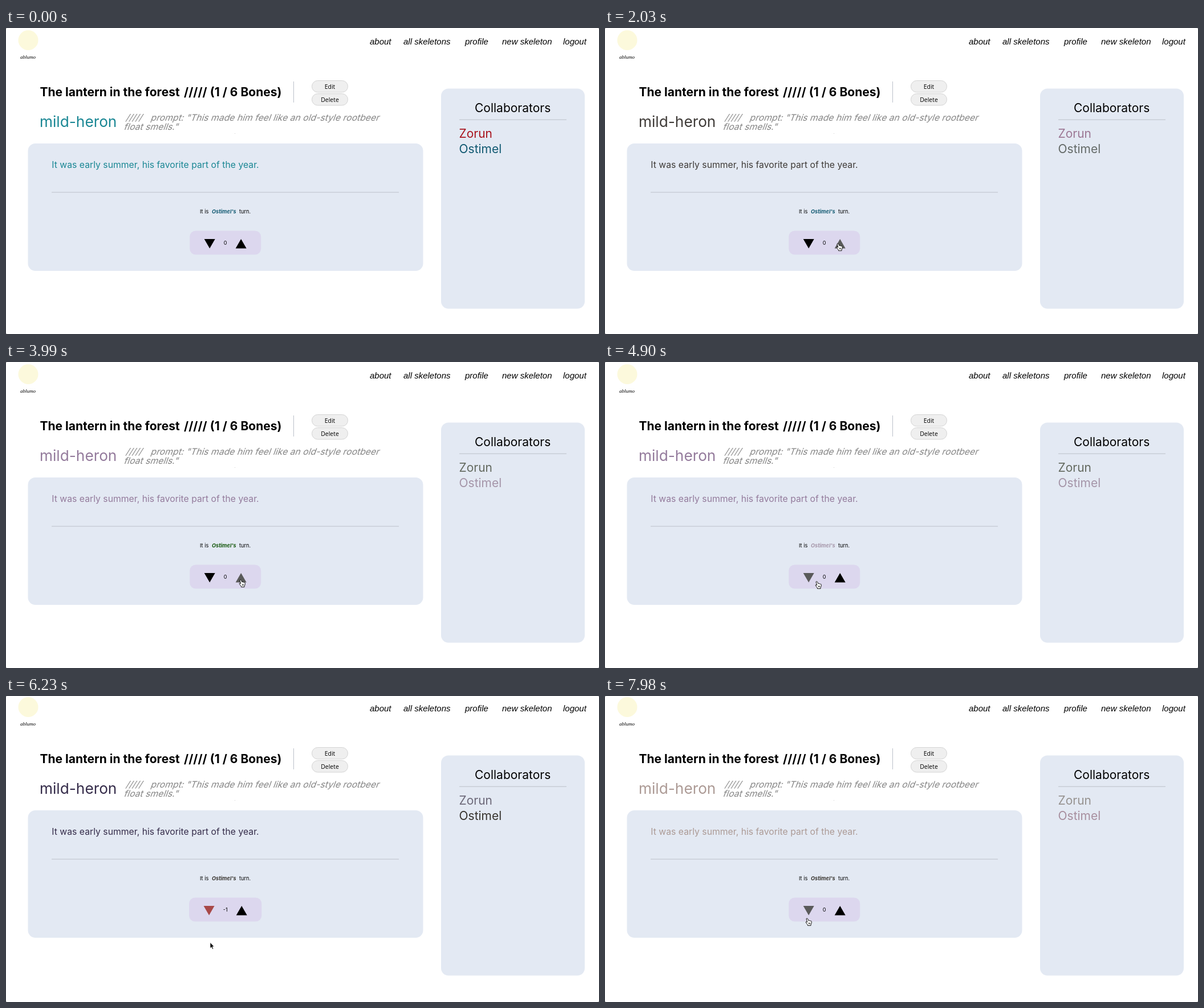
An HTML page for the animation above (8000 ms loop, 1040x538 px).

```html
<!DOCTYPE html>
<html lang="en">
<head>
<meta charset="utf-8">
<title>Skeleton page</title>
<style>
  html, body { margin: 0; width: 100%; height: 100%; overflow: hidden; background: #888; }
  svg { display: block; width: 100vw; height: 100vh; font-family: Inter, sans-serif; }
  text { white-space: pre; }
  .nav { font: italic 15px "Liberation Sans", sans-serif; }
  .mark { font: italic 9px "Liberation Serif", serif; }
  .title { font-size: 21px; font-weight: 700; }
  .author { font-size: 26.25px; }
  .prompt { font-size: 15.75px; fill: #858585; }
  .story { font-size: 15.75px; }
  .side { font-size: 21px; }
  .small { font-size: 9.2px; }
  .next { font-weight: 700; font-style: italic; }
  .ui { font: 10.5px "Open Sans", sans-serif; }
  .ui, #count { text-anchor: middle; }
  .button { fill: #efefef; stroke: #d4d4d4; }
  .panel { fill: #e3e9f3; }
  .rule { fill: none; stroke: #bcc0c9; }
</style>
</head>
<body>
<svg viewBox="0 0 1040 538">
  <rect width="1040" height="538" rx="2" fill="#fff"/>
  <g id="page">
    <circle cx="39" cy="21.5" r="17.5" fill="#fcf9dc"/>
    <text class="mark" x="25" y="54">ablumo</text>
    <g class="nav">
      <text x="638" y="29">about</text>
      <text x="697" y="29">all skeletons</text>
      <text x="805" y="29">profile</text>
      <text x="870" y="29">new skeleton</text>
      <text x="977" y="29">logout</text>
    </g>

    <text class="title" x="59.5" y="120">The lantern in the forest</text>
    <text class="title" x="312" y="120">///// (1 / 6 Bones)</text>
    <path class="rule" d="M504.5 94V131"/>
    <rect class="button" x="536.5" y="92.5" width="63" height="20.5" rx="10.2"/>
    <rect class="button" x="536.5" y="115.5" width="63" height="20.5" rx="10.2"/>
    <text class="ui" x="568" y="106.5">Edit</text>
    <text class="ui" x="568" y="130">Delete</text>

    <text class="author" id="author" x="59" y="173.8">mild-heron</text>
    <g class="prompt">
      <text transform="translate(209.5 163) skewX(-20)">/////</text>
      <text transform="translate(253 163) skewX(-20)">prompt: "This made him feel like an old-style rootbeer</text>
      <text transform="translate(206 179) skewX(-20)">float smells."</text>
    </g>
    <rect x="401" y="185" width="1" height="1" fill="#ccc"/>

    <rect class="panel" x="38.5" y="203" width="693" height="224" rx="13"/>
    <text class="story" id="story" x="80.3" y="246">It was early summer, his favorite part of the year.</text>
    <path class="rule" d="M80 288.9H689"/>
    <text class="small" x="340" y="326.3">It is</text>
    <text class="small next" id="next" x="361" y="326.3">Ostimel's</text>
    <text class="small" x="409" y="326.3">turn.</text>

    <rect id="voteBox" y="356.5" height="42" rx="10.5" fill="#dcd7ee"/>
    <path id="down" d="M-9.5 371H9.5L0 387.5Z"/>
    <path id="up" d="M-9.5 387.5H9.5L0 371Z"/>
    <text class="small" id="count" x="384.7" y="381.3"></text>

    <rect class="panel" x="763" y="106.5" width="252" height="387" rx="13"/>
    <text class="side" x="822" y="147.7">Collaborators</text>
    <path class="rule" d="M795 161.2H983"/>
    <text class="side" id="first" x="794.5" y="193">Zorun</text>
    <text class="side" id="second" x="794.5" y="219.8">Ostimel</text>
  </g>
  <path id="arrow" d="M0 0V10.4L2.4 8.2L4 12L5.8 11.2L4.2 7.6H7.2Z"
    stroke="#fff" stroke-width=".8"/>
  <path id="hand" fill="#fff" stroke="#111" stroke-linejoin="round"
    d="M-2.6-6Q-3.8-6.4-3.9-5L-2.2.8L-4-.2Q-5.4 0-4.6 1.4L-1.6 5.2V6.6H4V5L5.2 2V-.7Q4.8-2 3.6-1.3Q3-2.5 1.8-1.9Q1-3-.3-2.3L-1.4-5.2Q-1.8-6-2.6-6ZM.6 1.6V4.2M2.3 1.6V4.2"/>
</svg>
<script>
const LOOP = 8000, STEP = 70, CENTER = 384.7, ARROW_Y = 379, TURN_LAG = 100;
const HOVER = [90, 90, 90], IDLE = [0, 0, 0], LIKED = [47, 158, 65], DISLIKED = [168, 72, 72];

// every redraw of the page gives the writers new colours
const redraws = [
  { at: 0, vote: 0, main: "#1a8794", first: "#a8121c", second: "#125a72" },
  { at: 2030, vote: 0, main: "#3f3b38", first: "#9c7794", second: "#646a68" },
  { at: 2240, vote: 1, main: "#a90a10", first: "#96a0a8", second: "#14570c" },
  { at: 3990, vote: 0, main: "#947b9c", first: "#63695f", second: "#a595a8" },
  { at: 5880, vote: -1, main: "#352c4a", first: "#6c6878", second: "#38342f" },
  { at: 7910, vote: 0, main: "#ac9a95", first: "#96928f", second: "#a88f9f" },
];

const entry = { at: 840, x: 446, y: 372 };
const moves = [
  { from: 840, to: 1400, x: 411, y: 385 },
  { from: 2240, to: 2660, x: 395, y: 450 },
  { from: 3780, to: 3990, x: 414, y: 389 },
  { from: 4130, to: 5320, x: 358, y: 393 },
  { from: 5880, to: 6510, x: 358, y: 462 },
  { from: 6860, to: 7490, x: 357, y: 397 },
];

const el = id => document.getElementById(id);
const clamp = v => Math.min(1, Math.max(0, v));
const mix = (a, b, p) => a + (b - a) * p;
const paint = (id, color) => el(id).setAttribute("fill", color);
const place = (id, x, y) => el(id).setAttribute("transform", `translate(${x} ${y})`);
const pageAt = t => redraws.findLast(r => r.at <= Math.max(0, t));

function ease(t, from, to) {
  const p = clamp((t - from) / (to - from));
  return p * p * (3 - 2 * p);
}

function cursorAt(t) {
  return moves.reduce((pos, m) => {
    const p = ease(t, m.from, m.to);
    return { x: mix(pos.x, m.x, p), y: mix(pos.y, m.y, p) };
  }, entry);
}

// draws a vote arrow and returns how far the cursor hovers over it
function drawArrow(id, x, base, cursor) {
  const hover = clamp((30 - Math.hypot(cursor.x - x, cursor.y - ARROW_Y)) / 8);
  paint(id, `rgb(${base.map((v, i) => mix(v, HOVER[i], hover))})`);
  place(id, x, 0);
  return hover;
}

function render(t) {
  const { vote, main, first, second } = pageAt(t);
  paint("author", main);
  paint("story", main);
  paint("first", first);
  paint("second", second);
  paint("next", pageAt(t - TURN_LAG).second);

  el("count").textContent = vote;
  const half = 59.6 + el("count").getComputedTextLength() / 2;
  const gap = half - 35;
  el("voteBox").setAttribute("x", CENTER - half);
  el("voteBox").setAttribute("width", half * 2);

  const cursor = cursorAt(t);
  const hover = Math.max(
    drawArrow("down", CENTER - gap, vote < 0 ? DISLIKED : IDLE, cursor),
    drawArrow("up", CENTER + gap, vote > 0 ? LIKED : IDLE, cursor));
  const pointer = t < entry.at ? "" : hover > 0.5 ? "hand" : "arrow";
  for (const id of ["arrow", "hand"]) {
    el(id).style.display = id === pointer ? "" : "none";
    place(id, cursor.x, cursor.y);
  }
  place("page", 0, -2 * ease(t, 4900, 5600));
}

const start = performance.now();
function tick() {
  const t = (performance.now() - start) % LOOP;
  render(Math.floor(t / STEP) * STEP);
  requestAnimationFrame(tick);
}
tick();
</script>
</body>
</html>
```
